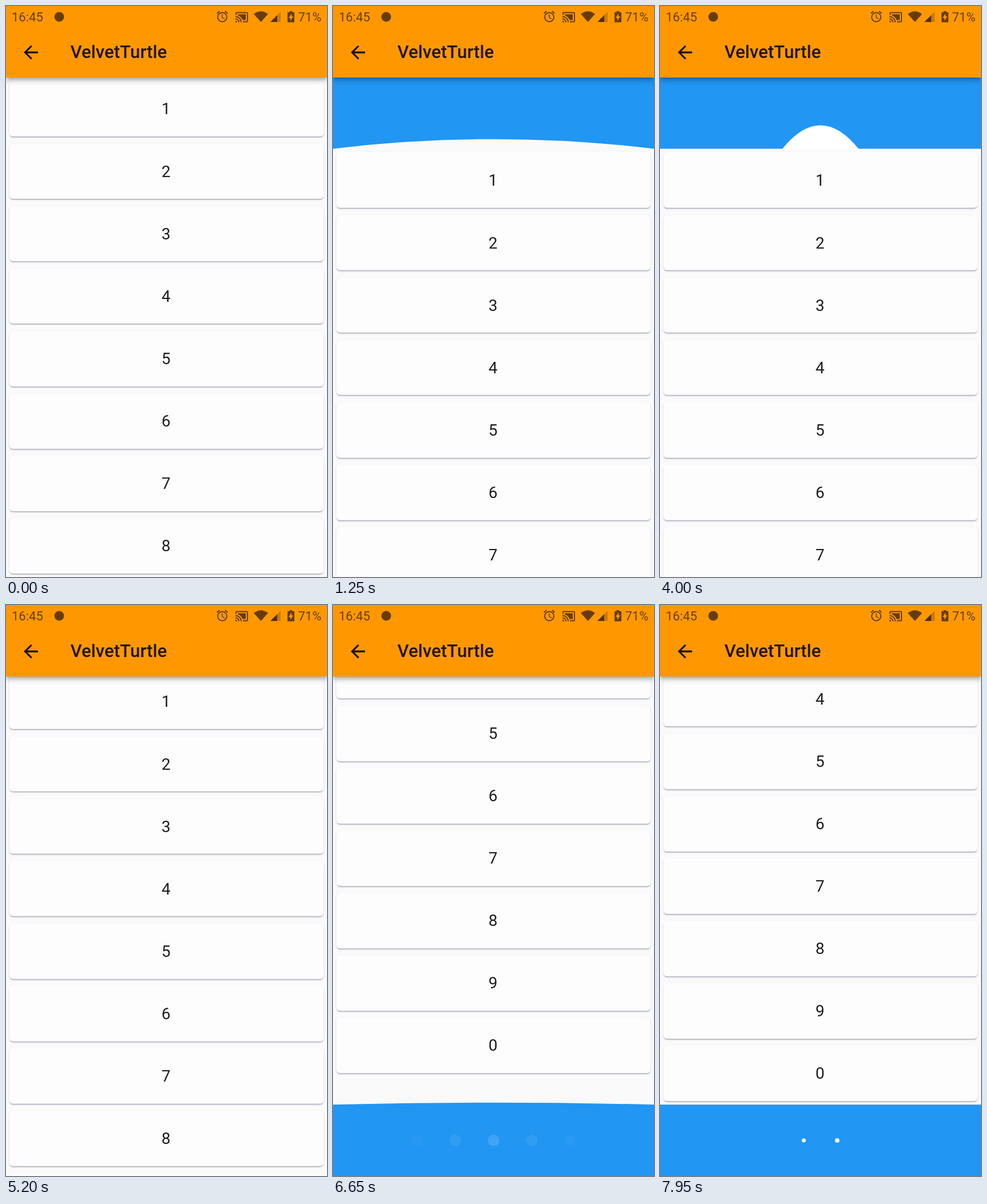
Animation, 561 px wide and 998 px high, one loop 8000 ms. Source, as an HTML page:

```html
<!DOCTYPE html>
<html lang="en">
<head>
<meta charset="utf-8">
<title>Pull to refresh</title>
<style>
  html, body { margin: 0; width: 100%; height: 100%; overflow: hidden; background: #fafafa; }
  #stage { position: absolute; left: 0; top: 0; width: 561px; height: 998px; overflow: hidden; font-family: Roboto, sans-serif; }
  #list { position: absolute; left: 0; top: 125.3px; width: 100%; }
  .card {
    position: absolute; left: 6px; width: 549px; height: 96.7px; border-radius: 6px;
    box-sizing: border-box; padding-right: 1.6px;
    background: #fdfdfd; color: #1d1d1d; font-size: 28px; line-height: 98px; text-align: center;
    box-shadow: 0 3px 1.5px -1.5px rgba(40, 40, 90, .2), 0 1.5px 1.5px rgba(40, 40, 90, .16), 0 1.5px 4.5px rgba(0, 0, 0, .08);
  }
  svg { position: absolute; left: 0; top: 0; }
  #bar {
    position: absolute; left: 0; top: 0; width: 100%; height: 125px; background: #ff9800;
    box-shadow: 0 3px 6px -1.5px rgba(0, 0, 0, .2), 0 6px 8px rgba(0, 0, 0, .14), 0 1.5px 15px rgba(0, 0, 0, .12);
  }
  #bar span { position: absolute; white-space: nowrap; }
  .status { top: 7px; font-size: 22px; line-height: 26px; color: rgba(0, 0, 0, .6); }
  .title { left: 112.5px; top: 62px; font-size: 31.2px; line-height: 37px; font-weight: 500; color: rgba(0, 0, 0, .87); }
</style>
</head>
<body>
<div id="stage">
  <div id="list"></div>

  <svg width="561" height="998">
    <defs><clipPath id="headClip"><rect y="124" width="561" height="127"/></clipPath></defs>
    <path id="head" fill="#2196f3"/>
    <g clip-path="url(#headClip)" fill="#fff">
      <path id="hump"/>
      <circle id="ball" cx="280.5" r="23.4"/>
      <circle id="ring" cx="280.5" cy="187" r="29.8" fill="none" stroke="#fff" stroke-width="3.1" pathLength="100"/>
    </g>
    <path id="foot" fill="#2196f3"/>
    <g id="dragDots" fill="#fff"></g>
    <g id="loadDots" fill="#fff"></g>
  </svg>

  <div id="bar">
    <span class="status" style="left:10px">16:45</span>
    <span class="status" style="left:510.5px">71%</span>
    <span class="title">VelvetTurtle</span>
    <svg width="561" height="125" fill="#000" fill-opacity=".6">
      <circle cx="93" cy="19" r="8.5"/>
      <path transform="translate(366 6.5)" d="M22 5.72l-4.6-3.86-1.29 1.53 4.6 3.86L22 5.72zM7.88 3.39L6.6 1.86 2 5.71l1.29 1.53 4.59-3.85zM12.5 8H11v6l4.75 2.85.75-1.23-4-2.37V8zM12 4a9 9 0 1 0 0 18a9 9 0 0 0 0-18zm0 16a7 7 0 1 1 0-14a7 7 0 0 1 0 14z"/>
      <path transform="translate(400 7.5)" d="M1 18v3h3c0-1.66-1.34-3-3-3zm0-4v2c2.76 0 5 2.24 5 5h2c0-3.87-3.13-7-7-7zm18-7H5v1.63c3.96 1.28 7.09 4.41 8.37 8.37H19V7zM1 10v2c4.97 0 9 4.03 9 9h2c0-6.08-4.93-11-11-11zm20-7H3c-1.1 0-2 .9-2 2v3h2V5h18v14h-7v2h7c1.1 0 2-.9 2-2V5c0-1.1-.9-2-2-2z"/>
      <path d="M433 14Q445.5 4.5 458 14L445.5 28z"/>
      <path d="M480 10V28H462z" fill-opacity=".2"/>
      <path d="M474 16V28H462z"/>
      <path fill-rule="evenodd" d="M495.5 9h5v2h3.5v17.5h-12V11h3.5zM499 13l-5 8h3v5l5-8h-3z"/>
      <path transform="translate(24.9 62.4) scale(1.558)" fill-opacity=".9" d="M20 11H7.83l5.59-5.59L12 4l-8 8 8 8 1.41-1.41L7.83 13H20v-2z"/>
    </svg>
  </div>
</div>

<script>
const LOOP = 8000, W = 561, H = 998, MID = W / 2, TOP = 124.7, EXT = 124.7, PITCH = 109.1;
const $ = id => document.getElementById(id);
const set = (el, attrs) => { for (const k in attrs) el.setAttribute(k, attrs[k]); };

const span = (t, a, b) => Math.min(1, Math.max(0, (t - a) / (b - a)));
const mix = (a, b, k) => a + (b - a) * k;
const smooth = x => x * x * (3 - 2 * x);
const quad = x => x < .5 ? 2 * x * x : 1 - 2 * (1 - x) ** 2;
const out = x => 1 - (1 - x) ** 2;

const HEAD = { start: 40, hold: 850, release: 925, settle: 1210, peak: 185, bounce: 1000, swing: [1, 0, -1, 0, -.4, 0] };
const FOOT = { start: 6040, hold: 6540, release: 6571, settle: 6895, peak: 182, bounce: 800, swing: [1, 0, -.8, 0, -.4, 0] };

// how far the list is dragged past its edge
const pullOf = (p, t) => t < p.release
  ? p.peak * smooth(span(t, p.start, p.hold))
  : mix(p.peak, EXT, smooth(span(t, p.release, p.settle)));

// height of the curved edge: follows the drag, then swings out
function waveOf(p, t, pull) {
  if (t < p.release) return Math.max(0, pull - EXT);
  const x = out(span(t, p.release, p.release + p.bounce)) * 5;
  const i = Math.min(4, Math.floor(x));
  return (p.peak - EXT) * mix(p.swing[i], p.swing[i + 1], x - i);
}

function addDots(group, n) {
  return Array.from({ length: n }, () => {
    const c = document.createElementNS("http://www.w3.org/2000/svg", "circle");
    return group.appendChild(c);
  });
}
const dragDots = addDots($("dragDots"), 7), loadDots = addDots($("loadDots"), 3);

for (let i = 0; i < 10; i++) {
  const card = document.createElement("div");
  card.className = "card";
  card.style.top = 6.2 + i * PITCH + "px";
  card.textContent = (i + 1) % 10;
  $("list").append(card);
}

function drawHead(t, pull) {
  const shown = pull > .1 && t < 4800;
  const y = TOP + Math.min(pull, EXT);
  const wave = waveOf(HEAD, t, pull);
  set($("head"), { d: shown ? `M0 ${TOP - 5}H${W}V${y}Q${MID} ${y + wave * 2} 0 ${y}z` : "" });

  const base = TOP + EXT;
  let h = 0, half = 66.5, cy = 300;
  if (t >= 1300 && t < 3650) {
    const rise = span(t, 1300, 1650);
    cy = mix(base + 24, 187, out(rise));
    h = 36 * Math.sin(Math.PI * rise);
    half = mix(80, 40, rise);
  } else if (t >= 3650 && t < 4500) {
    const fall = span(t, 3650, 3990), sink = span(t, 4000, 4430);
    cy = mix(187, base + 26, fall * fall);
    h = 41 * smooth(span(t, 3800, 4000)) * (1 - smooth(sink));
    half = mix(66.5, 100, sink);
  }
  set($("ball"), { cy });
  set($("hump"), { d: h > .2 ? `M${MID - half} ${base}Q${MID} ${base - 2 * h} ${MID + half} ${base}v1.5H${MID - half}z` : "" });

  const spin = t - 1650, sweep = 38 - 35 * Math.cos(spin / 1333 * 2 * Math.PI);
  set($("ring"), {
    visibility: spin > 0 && t < 3500 ? "visible" : "hidden",
    "stroke-dasharray": `${sweep} ${100 - sweep}`,
    transform: `rotate(${spin * .4 - 90} ${MID} 187)`
  });
}

function drawFoot(t, pull) {
  const y = H - Math.min(pull, EXT), cy = y + 62.5;
  const wave = waveOf(FOOT, t, pull);
  set($("foot"), { d: pull > .1 ? `M0 ${H}V${y}Q${MID} ${y - wave * 2} ${W} ${y}V${H}z` : "" });

  const ratio = Math.min(1, pull / EXT);
  const alpha = .8 * ratio * (1 - span(t, FOOT.release, FOOT.release + 96));
  dragDots.forEach((dot, i) => {
    const n = i - 3;
    set(dot, { cx: MID + n * 67 * ratio, cy, r: 10, opacity: alpha * (1 - 2 * Math.abs(n) / 7) ** 2 });
  });

  const fade = span(t, 6680, 6850);
  loadDots.forEach((dot, i) => {
    const phase = (t - 6627) / 1400 - i * .2;
    set(dot, { cx: MID + (i - 1) * 29.2, cy, r: 10.8 * (1 + Math.sin(phase * 2 * Math.PI)) / 2, opacity: fade });
  });
}

function draw(t) {
  const head = pullOf(HEAD, t) * (1 - out(span(t, 4480, 4800)));
  const foot = pullOf(FOOT, t);
  const scroll = 218.2 * quad(span(t, 5075, 5850));
  $("list").style.transform = `translateY(${head - scroll - foot}px)`;
  drawHead(t, head);
  drawFoot(t, foot);
}

let begin;
function tick(now) {
  begin ??= now;
  draw((now - begin) % LOOP);
  requestAnimationFrame(tick);
}
draw(0);
requestAnimationFrame(tick);
</script>
</body>
</html>
```
